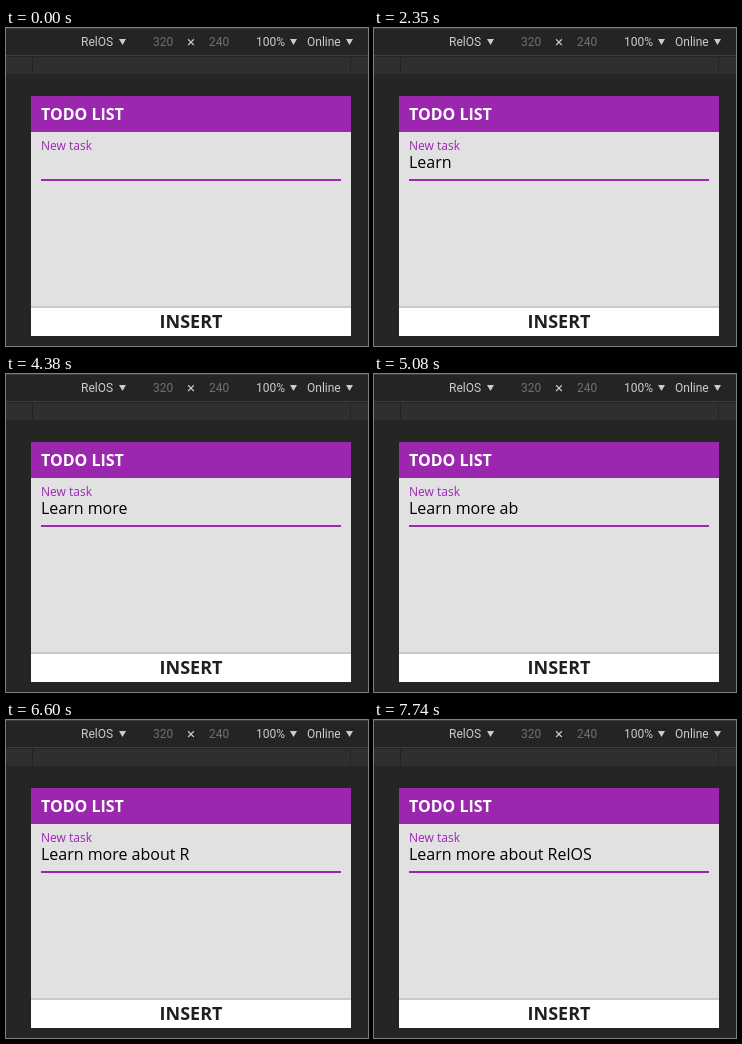
Write an HTML page that moves like this. It is 362 by 318 pixels and loops after 8 s.

```html
<!DOCTYPE html>
<html lang="en">
<head>
<meta charset="utf-8">
<title>Todo list</title>
<style>
  html, body { margin: 0; width: 100%; height: 100%; overflow: hidden; background: #242424; }
  #stage { position: relative; width: 362px; height: 318px; overflow: hidden; background: #252525; }
  #stage div { position: absolute; white-space: pre; }

  .bar { left: 0; top: 0; width: 362px; height: 27px; background: #242424;
    border-bottom: 1px solid #3d3d3d; box-shadow: inset 0 1px #3d3d3d;
    font: 12px/14px Roboto, sans-serif; color: #cbcbcb; }
  .bar div { top: 7px; }
  .bar .dim { color: #707070; }
  .bar .arrow { top: 11px; width: 7px; height: 6px; background: #cbcbcb;
    clip-path: polygon(0 0, 100% 0, 50% 100%); }

  .ruler { left: 0; top: 29px; width: 362px; height: 17px; background: #2f2f2f; }
  .ruler div { top: 0; width: 1px; height: 17px; background: #232323; }

  .app { left: 25px; top: 68px; width: 320px; height: 240px; background: #e1e1e1;
    font: 16px/22px "Open Sans", sans-serif; color: #000; }
  .head { left: 0; top: 0; width: 320px; height: 36px; background: #9b27af; }
  .title { left: 10px; top: 7px; font-weight: 700; color: #fff; }
  .label { left: 10px; top: 41px; font-size: 12px; line-height: 17px; color: #9b27af; }
  .field { left: 10px; top: 55px; width: 300px; height: 28px; border-bottom: 2px solid #9b27af; }
  .softkey { left: 0; top: 210px; width: 320px; height: 28px; border-top: 2px solid #c9c9c9;
    background: #fff; color: #1f1f1f; text-align: center;
    font-size: 18px; font-weight: 700; line-height: 27px; }
</style>
</head>
<body>
<div id="stage">
  <div class="bar">
    <div style="left:75px">RelOS</div><div class="arrow" style="left:113px"></div>
    <div class="dim" style="left:147px">320</div>
    <div style="left:181px;font-size:15px">×</div>
    <div class="dim" style="left:203px">240</div>
    <div style="left:250px">100%</div><div class="arrow" style="left:284px"></div>
    <div style="left:301px">Online</div><div class="arrow" style="left:340px"></div>
  </div>
  <div class="ruler"><div style="left:26px"></div><div style="left:344px"></div></div>
  <div class="app">
    <div class="head"></div>
    <div class="title">TODO LIST</div>
    <div class="label">New task</div>
    <div class="field" id="field"></div>
    <div class="softkey">INSERT</div>
  </div>
</div>
<script>
  const LOOP = 8000;
  const BACK = "<";
  // [time in ms, typed keys]
  const keys = [
    [910, "L"], [1270, "e"], [1550, "a"], [1910, "r"], [2350, "n"],
    [3100, " m"], [3510, "r"], [3980, BACK], [4140, "o"], [4260, "r"], [4380, "e"],
    [4880, " a"], [5080, "b"], [5360, "o"], [5460, "u"], [5940, "t"],
    [6600, " R"], [6850, "e"], [7170, "l"], [7570, "O"], [7740, "S"]
  ];
  const field = document.getElementById("field");

  function textAt(t) {
    return keys.reduce((text, [at, key]) =>
      at > t ? text : key === BACK ? text.slice(0, -1) : text + key, "");
  }

  function draw() {
    const text = textAt(performance.now() % LOOP);
    if (field.textContent !== text) field.textContent = text;
    requestAnimationFrame(draw);
  }
  draw();
</script>
</body>
</html>
```
